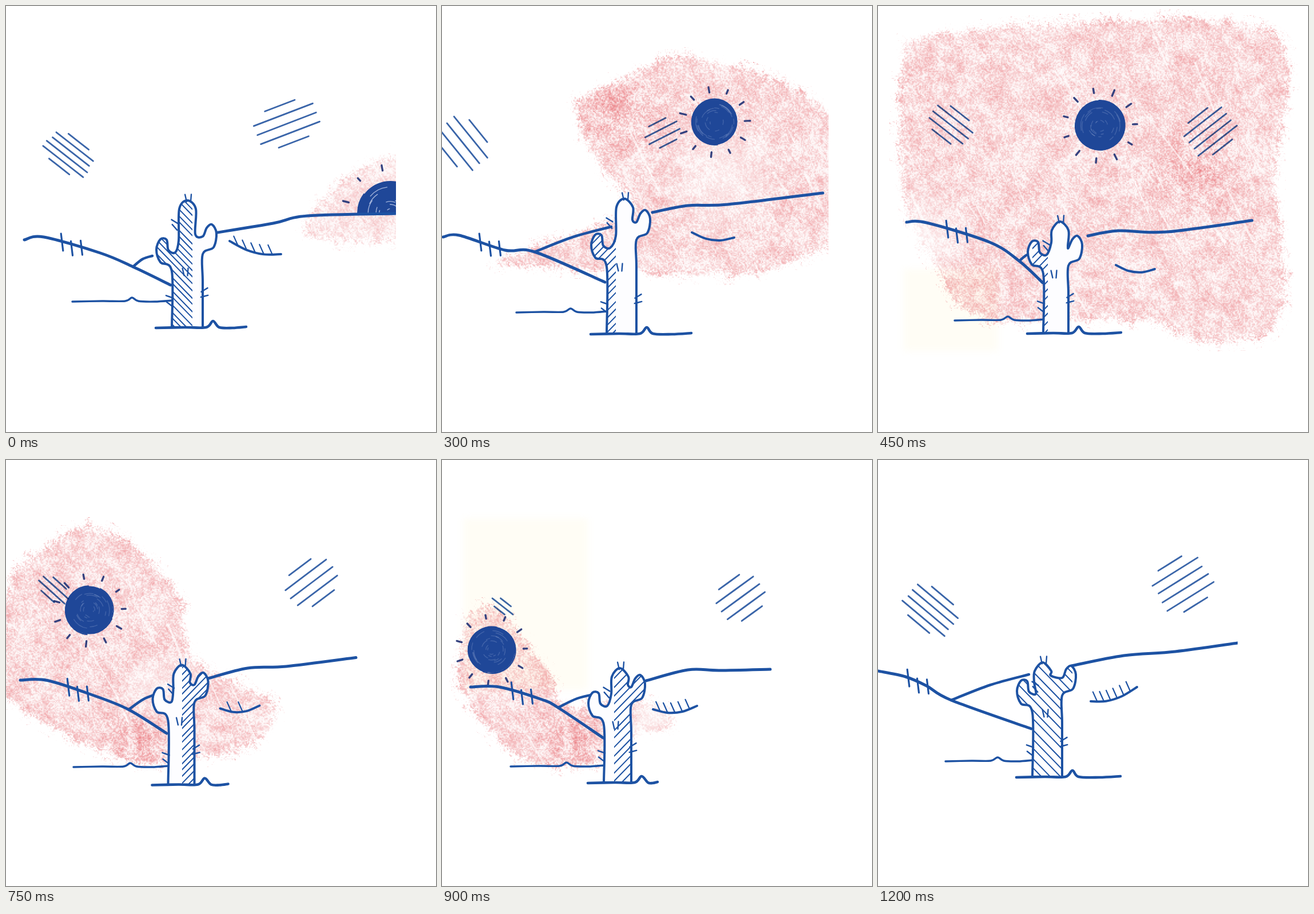
Write an HTML page with a canvas that moves like this. It is 752x745 px and loops after 1350 ms.

```html
<!DOCTYPE html>
<html lang="en">
<head>
<meta charset="utf-8">
<title>Desert day</title>
<style>
html, body { margin: 0; width: 100%; height: 100%; overflow: hidden; background: #fff; }
canvas { display: block; }
</style>
</head>
<body>
<canvas id="stage" width="752" height="745"></canvas>
<script>
const W = 752, H = 745, HOLD = 150, INK = '#1d52a3', SUN = '#1f4798';

// Hills, smile and pink are x,y key points; clouds are [x, y, length, degrees, lines, gap];
// hatch is [lean, gap, from x, to x]; the sun is [x, y, radius]; pale and strong are [x, y, radius].
const sunrise = {
  edge: 682,
  hill: [32,409, 66,404, 165,432, 222,456, 288,488], fork: [256,437],
  ridge: [364,397, 467,380, 527,367, 681,363],
  cactus: { x: 317, w: 27, top: 340, base: 562, left: 408, right: 382, head: 0 },
  hatch: [1, 12, 255, 326], ground: [116, 516], baseEnd: 420, posts: 98,
  smile: [391,411, 481,434], ticks: 5,
  clouds: [[110, 259, 90, 38, 6, 11], [491, 206, 112, -21, 5, 17]],
  sun: [672, 362, 56], horizon: 363, gaps: .75, shade: 85,
  pink: [640,274, 700,268, 700,400, 560,408, 522,390, 565,330]
};

const morning = {
  edge: 676,
  hill: [2,404, 30,401, 110,427, 162,430, 285,483], fork: [296,386],
  ridge: [368,361, 430,349, 500,347, 666,327],
  cactus: { x: 314, w: 26, top: 337, base: 573, left: 400, right: 357, head: 5 },
  hatch: [-1, 13, 262, 304], ground: [130, 535], baseEnd: 436, posts: 67,
  smile: [437,396, 511,405], ticks: 0,
  clouds: [[37, 240, 100, 51, 5, 17], [386, 222, 66, -27, 4, 14]],
  sun: [477, 203, 40],
  pink: [235,165, 380,98, 470,97, 625,150, 700,230, 700,390, 600,450, 480,470, 180,455, 95,445, 250,395, 335,350, 255,250],
  pale: [490, 300, 120], strong: [300, 180, 120]
};

const noon = {
  edge: W,
  hill: [50,378, 85,379, 195,413, 247,446, 288,484], fork: [273,433],
  ridge: [367,402, 420,393, 505,395, 654,375],
  cactus: { x: 311, w: 22, top: 377, base: 572, left: 412, right: 402, head: 7 },
  hatch: [-1, 14, 270, 297], ground: [134, 549], baseEnd: 425, posts: 121,
  smile: [416,453, 484,460], ticks: 0,
  clouds: [[127, 208, 82, 38, 5, 13], [581, 219, 86, -38, 6, 14]],
  sun: [388, 209, 43],
  pink: [45,60, 300,33, 690,50, 695,300, 700,550, 560,585, 470,550, 190,545, 110,465, 42,320],
  pale: [80, 400, 100], strong: [560, 280, 100], warm: [45, 460, 165, 143]
};

const afternoon = {
  edge: W,
  hill: [0,373, 45,374, 130,404, 226,440, 280,470], fork: [262,408],
  ridge: [350,378, 415,361, 495,354, 650,325],
  cactus: { x: 306, w: 22, top: 353, base: 571, left: 393, right: 368, head: -2 },
  hatch: [-1, 9, 315, 350], ground: [116, 537], baseEnd: 400, posts: 95,
  smile: [380,433, 441,429], ticks: 0,
  clouds: [[61, 198, 76, 46, 5, 12], [547, 188, 102, -38, 5, 17]],
  sun: [206, 193, 42], gaps: .4,
  pink: [8,85, 180,65, 340,155, 410,290, 400,350, 530,365, 545,430, 490,512, 330,500, 275,530, 60,430, -15,370, 115,360, 60,220],
  pale: [160, 350, 80], strong: [235, 490, 80]
};

const evening = {
  edge: W,
  hill: [50,397, 100,397, 175,419, 203,433, 282,486], fork: [270,409],
  ridge: [357,386, 430,367, 485,368, 574,366],
  cactus: { x: 307, w: 24, top: 364, base: 564, left: 407, right: 376, head: 4 },
  hatch: [-1, 15, 301, 358], ground: [120, 535], baseEnd: 377, posts: 123,
  smile: [369,436, 446,430], ticks: 5,
  clouds: [[106, 256, 46, 38, 3, 9], [522, 241, 88, -36, 5, 17]],
  sun: [87, 332, 41],
  pink: [40,275, 95,262, 185,370, 215,430, 350,425, 405,460, 330,485, 270,530, 140,520, 35,400],
  pale: [370, 455, 70], strong: [230, 490, 80], warm: [38, 102, 217, 300]
};

const dusk = {
  edge: 629,
  hill: [0,369, 48,379, 85,395, 128,420, 268,470], fork: [264,375],
  ridge: [338,360, 430,342, 520,335, 629,320],
  cactus: { x: 296, w: 26, top: 354, base: 554, left: 386, right: 360, head: -8 },
  hatch: [1, 17, 240, 340], ground: [118, 526], baseEnd: 424, posts: 53,
  smile: [372,422, 453,397], ticks: 6,
  clouds: [[92, 262, 98, 40, 6, 13], [533, 217, 96, -32, 6, 17]]
};

// Halfway between two values, lists or objects.
function halfway(a, b) {
  if (typeof a === 'number') return (a + b) / 2;
  const mixed = Array.isArray(a) ? [] : {};
  for (const key in a) if (key in b && key !== 'pink') mixed[key] = halfway(a[key], b[key]);
  return mixed;
}

const poses = [
  sunrise,
  {
    ...halfway(sunrise, morning), hatch: [1, 13, 255, 318],
    pink: [400,235, 520,118, 620,130, 700,180, 700,420, 480,430, 440,350]
  },
  morning, noon, afternoon,
  {
    ...halfway(afternoon, evening),
    pink: [10,200, 150,118, 290,220, 330,350, 460,420, 440,490, 270,530, 150,500, -15,390]
  },
  evening,
  {
    ...halfway(evening, dusk), hatch: [1, 16, 240, 358], sun: [18, 382, 45], horizon: 383, gaps: .5,
    pink: [-15,350, 50,320, 110,400, 190,490, 130,510, -15,430]
  },
  dusk
];

let seed = 7;
const rand = () => (seed = seed * 16807 % 2147483647) / 2147483647;
const clamp = v => Math.max(0, Math.min(1, v));

const lattice = Float32Array.from({ length: 65536 }, rand);
function noise(x, y) {
  const i = Math.floor(x), j = Math.floor(y), fx = x - i, fy = y - j;
  const at = (a, b) => lattice[(a & 255) + (b & 255) * 256];
  const top = at(i, j) + (at(i + 1, j) - at(i, j)) * fx;
  const low = at(i, j + 1) + (at(i + 1, j + 1) - at(i, j + 1)) * fx;
  return top + (low - top) * fy;
}

// Waxy paper grain with faint diagonal streaks.
const grain = Float32Array.from({ length: W * H }, (_, i) => {
  const x = i % W, y = Math.floor(i / W);
  return .25 * noise((x + y * 1.3) / 12, (x - y * .75 + 900) / 4)
    + .45 * noise(x / 2, y / 2) + .3 * noise(x / 18, y / 18);
});

function layer() {
  const canvas = document.createElement('canvas');
  canvas.width = W;
  canvas.height = H;
  return canvas.getContext('2d', { willReadFrequently: true });
}

// Smooth line through all points.
function curve(p) {
  const path = new Path2D(), last = p.length / 2 - 1;
  const at = i => { const k = 2 * Math.max(0, Math.min(last, i)); return [p[k], p[k + 1]]; };
  path.moveTo(p[0], p[1]);
  for (let i = 0; i < last; i++) {
    const [a, b, c, d] = [at(i - 1), at(i), at(i + 1), at(i + 2)];
    path.bezierCurveTo(b[0] + (c[0] - a[0]) / 6, b[1] + (c[1] - a[1]) / 6,
      c[0] - (d[0] - b[0]) / 6, c[1] - (d[1] - b[1]) / 6, c[0], c[1]);
  }
  return path;
}

function stroke(g, path, width, color = INK) {
  g.lineWidth = width;
  g.strokeStyle = color;
  g.stroke(path);
}

// Straight mark centred on x, y.
function mark(g, x, y, length, angle, width, color) {
  const dx = Math.cos(angle) * length / 2, dy = Math.sin(angle) * length / 2;
  stroke(g, curve([x - dx, y - dy, x + dx, y + dy]), width, color);
}

// Red holds how hard the crayon presses, alpha the soft outline.
function crayon({ pink, shade = 115, pale, strong }) {
  const g = layer();
  g.filter = 'blur(8px)';
  g.fillStyle = `rgb(${shade},0,0)`;
  g.fill(curve([...pink, pink[0], pink[1]]));
  g.filter = 'none';
  g.globalCompositeOperation = 'source-atop';
  const press = ([x, y, r], level) => {
    const glow = g.createRadialGradient(x, y, 0, x, y, r);
    glow.addColorStop(0, `rgba(${level},0,0,.9)`);
    glow.addColorStop(1, `rgba(${level},0,0,0)`);
    g.fillStyle = glow;
    g.fillRect(0, 0, W, H);
  };
  if (pale) press(pale, 40);
  if (strong) press(strong, 180);
  for (let i = 0; i < 24; i++) {
    mark(g, rand() * W, rand() * 560, 40 + rand() * 90, .9 + rand() * .3, 2 + rand() * 2, 'rgba(0,0,0,.6)');
  }
  const image = g.getImageData(0, 0, W, H), d = image.data;
  for (let i = 0; i < W * H; i++) {
    const k = i * 4, n = grain[i];
    if (!d[k + 3]) continue;
    const rim = clamp(d[k + 3] / 127 - .5 + (n - .5) * 3);
    d[k + 3] = 255 * rim * d[k] / 255 * (.18 + clamp((n - .33) * 1.9));
    [d[k], d[k + 1], d[k + 2]] = [230, 100, 106];
  }
  g.putImageData(image, 0, 0);
  return g.canvas;
}

function drawSun(g, { sun: [x, y, r], horizon = H, gaps = .2 }) {
  g.save();
  g.beginPath();
  g.rect(0, 0, W, horizon);
  g.clip();
  const ring = (radius, from, sweep) => {
    const path = new Path2D();
    path.ellipse(x + rand() * 2 - 1, y + rand() * 2 - 1, radius, radius * (.96 + rand() * .06), 0, from, from + sweep);
    return path;
  };
  g.fillStyle = SUN;
  g.fill(ring(r, 0, 7));
  for (let i = 0; i < 5; i++) stroke(g, ring(r - 1 + rand() * 2, rand() * 6, 3), 2, SUN);
  for (let i = 0; i < 26; i++) {
    stroke(g, ring(r * (.15 + rand() * .72), rand() * 6.3, .2 + rand() * .7), 1.4, `rgba(205,215,240,${gaps})`);
  }
  for (let i = 0; i < 11; i++) {
    const a = -1.75 + i * Math.PI * 2 / 11, reach = r * 1.43;
    mark(g, x + Math.cos(a) * reach, y + Math.sin(a) * reach, 6 + rand() * 5, a, 3.4, '#34427f');
  }
  g.restore();
}

// Lines stacked across their direction, shorter at both ends of the stack.
function drawCloud(g, [x, y, length, degrees, lines, gap]) {
  const a = degrees * Math.PI / 180, n = Math.round(lines);
  for (let i = 0; i < n; i++) {
    const side = i - (n - 1) / 2, trim = i && i < n - 1 ? .9 + rand() * .1 : .5;
    const shift = side * gap * Math.sign(a);
    mark(g, x - Math.sin(a) * shift * Math.sign(a), y + Math.cos(a) * side * gap, length * trim, a, 2.8, '#3a65a9');
  }
}

function drawCactus(g, { cactus: { x, w, top, base, left, right, head }, hatch: [lean, gap, x0, x1] }) {
  const l = x - w, r = x + w, h = x + head;
  const body = curve([
    l, base, l, left + 56, l - 20, left + 40, l - 27, left + 18, l - 20, left, l - 9, left + 1, l - 6, left + 19,
    l + 6, left + 23, h - 15, left + 2, h - 14, top + 15, h, top, h + 15, top + 15, h + 14, right + 17,
    r, right + 21, r + 7, right + 6, r + 16, right, r + 24, right + 15, r + 19, right + 40, r, right + 52,
    r, right + 100, r, base
  ]);
  g.fillStyle = '#fdfdff';
  g.fill(body);
  g.save();
  g.clip(body);
  g.beginPath();
  g.rect(x0, 0, x1 - x0, H);
  g.clip();
  for (let y = top - 80; y < base + 80; y += gap) mark(g, x, y + rand() * 3, 200, lean * .8, 2);
  g.restore();
  stroke(g, body, 4);

  const pair = (px, py, angle, dx, dy) => {
    for (const k of [-.5, .5]) mark(g, px + dx * k, py + dy * k, 13, angle + k * .3, 2.4);
  };
  pair(h + 2, top - 4, 1.5, 9, 0);
  pair(l + 5, top + 42, .7, 0, 10);
  pair(l - 4, base - 47, .5, 0, 13);
  pair(r + 3, base - 60, -.4, 0, 11);
  pair(x - 3, left + 57, 1.5, 8, 0);
}

function drawSmile(g, { smile: [x0, y0, x1, y1], ticks }) {
  const at = t => [x0 + (x1 - x0) * t, y0 + (y1 - y0) * t + 36 * t * (1 - t)];
  stroke(g, curve([0, .33, .67, 1].flatMap(at)), 4);
  for (let i = 1; i <= ticks; i++) {
    const [x, y] = at(i / (ticks + 1));
    mark(g, x - 4, y - 9, 18, 1.15, 2.2);
  }
}

// Near-level ground line with one bump at b.
const bumpy = (x0, x1, y, b, rise) =>
  curve([x0, y + 1, (x0 + b) / 2, y, b - 12, y, b, y - rise, b + 11, y, (x1 + b) / 2 + 5, y + 1, x1, y - 1]);

function heightAt(p, x) {
  let i = 0;
  while (i < p.length - 4 && p[i + 2] < x) i += 2;
  return p[i + 1] + (p[i + 3] - p[i + 1]) * (x - p[i]) / (p[i + 2] - p[i]);
}

function drawLand(g, { hill, fork, ridge, ground, posts, cactus }) {
  const [fx, fy] = [hill[6], hill[7]];
  stroke(g, curve(hill), 5);
  stroke(g, curve([fx, fy, (fx + fork[0]) / 2, (fy + fork[1]) / 2 - 4, ...fork]), 4.5);
  stroke(g, curve(ridge), 5);
  const wall = cactus.x - cactus.w;
  stroke(g, bumpy(ground[0], wall, ground[1], ground[0] + (wall - ground[0]) * .6, 6), 3.4);
  for (let i = 0; i < 3; i++) {
    const x = posts + i * 17;
    mark(g, x, heightAt(hill, x) + (i === 1 ? 6 : 0), i ? 25 : 30, 1.45, 3.2);
  }
}

function render(pose) {
  const g = layer(), { cactus } = pose;
  g.fillStyle = '#fff';
  g.fillRect(0, 0, W, H);
  g.beginPath();
  g.rect(0, 0, pose.edge, H);
  g.clip();
  g.lineCap = g.lineJoin = 'round';
  if (pose.warm) {
    g.filter = 'blur(6px)';
    g.fillStyle = '#fffdf5';
    g.fillRect(...pose.warm);
    g.filter = 'none';
  }
  if (pose.pink) g.drawImage(crayon(pose), 0, 0);
  if (pose.sun) drawSun(g, pose);
  g.globalCompositeOperation = 'multiply';
  for (const cloud of pose.clouds) drawCloud(g, cloud);
  g.globalCompositeOperation = 'source-over';
  drawLand(g, pose);
  drawCactus(g, pose);
  stroke(g, bumpy(cactus.x - cactus.w - 28, pose.baseEnd, cactus.base, cactus.x + cactus.w + 18, 11), 4.6);
  drawSmile(g, pose);
  return g.canvas;
}

const drawings = poses.map(render);
const view = document.getElementById('stage').getContext('2d');
const start = performance.now();

function tick() {
  const elapsed = performance.now() - start;
  view.drawImage(drawings[Math.floor(elapsed / HOLD) % drawings.length], 0, 0);
  requestAnimationFrame(tick);
}
tick();
</script>
</body>
</html>
```
